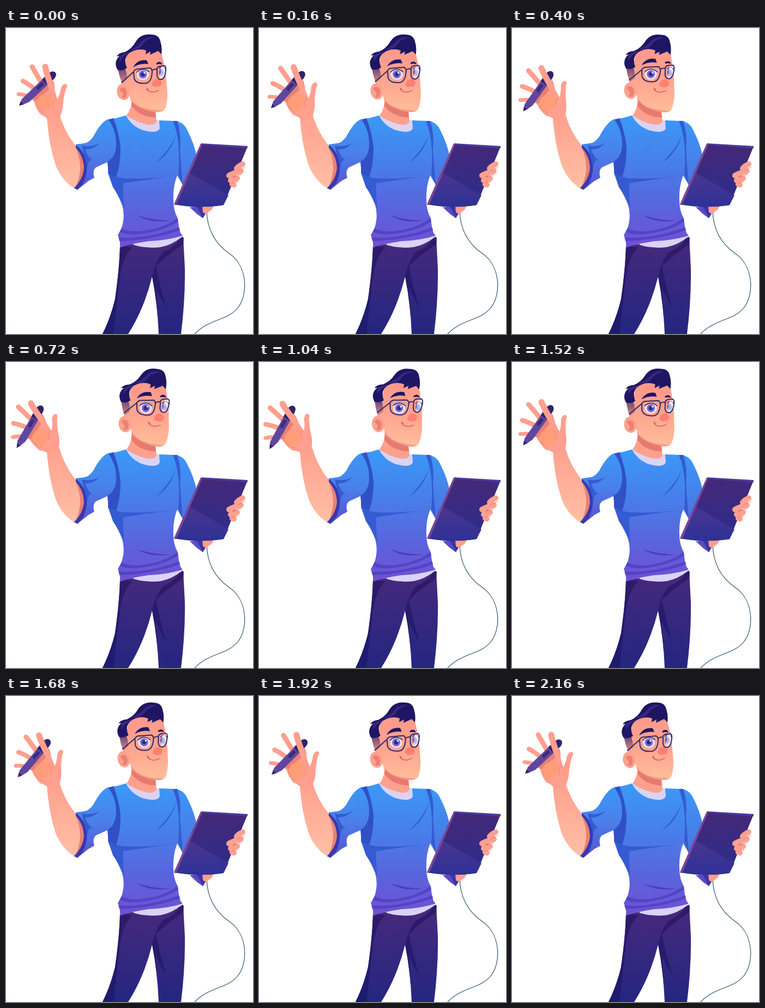
Recreate the animation shown at these times as an HTML page. Size 453x560 px, loop 2240 ms.

```html
<!DOCTYPE html>
<html lang="en">
<head>
<meta charset="utf-8">
<title>Waving designer</title>
<style>
html, body { margin: 0; height: 100%; overflow: hidden; background: #fff; }
svg { display: block; width: 100vw; height: 100vh; }
.line { fill: none; stroke-linecap: round; stroke-linejoin: round; }
.fold { fill: #345bd2; }
.low { fill: #4d3dbf; }
.hair { fill: #1e1664; }
.shade { fill: #ea8074; }
.frame { stroke: #302967; stroke-width: 2; }
.finger { stroke: #ff9f8e; }
</style>
</head>
<body>
<svg viewBox="0 0 453 560">
  <defs>
    <linearGradient id="shirt" gradientUnits="userSpaceOnUse" x1="0" y1="165" x2="0" y2="400">
      <stop stop-color="#3b98f7"/><stop offset=".35" stop-color="#477fea"/>
      <stop offset=".7" stop-color="#5a64dc"/><stop offset="1" stop-color="#7050d4"/>
    </linearGradient>
    <linearGradient id="sleeve" gradientUnits="userSpaceOnUse" x1="0" y1="165" x2="0" y2="295">
      <stop stop-color="#3b98f7"/><stop offset=".5" stop-color="#4a80e9"/><stop offset="1" stop-color="#5a50d0"/>
    </linearGradient>
    <linearGradient id="pants" gradientUnits="userSpaceOnUse" x1="0" y1="390" x2="0" y2="560">
      <stop stop-color="#46297d"/><stop offset="1" stop-color="#242680"/>
    </linearGradient>
    <linearGradient id="pantsDark" gradientUnits="userSpaceOnUse" x1="0" y1="390" x2="0" y2="560">
      <stop stop-color="#311a68"/><stop offset="1" stop-color="#1c1c70"/>
    </linearGradient>
    <linearGradient id="tablet" x1="0" y1="0" x2="0" y2="1">
      <stop stop-color="#452878"/><stop offset="1" stop-color="#2a2d8c"/>
    </linearGradient>
    <linearGradient id="glare" x1="0" y1="0" x2="0" y2="1">
      <stop stop-color="#4c3590"/><stop offset="1" stop-color="#2d3196"/>
    </linearGradient>
    <linearGradient id="face" gradientUnits="userSpaceOnUse" x1="0" y1="45" x2="0" y2="153">
      <stop stop-color="#ff9a8b"/><stop offset=".5" stop-color="#ffa590"/><stop offset="1" stop-color="#ffbe9a"/>
    </linearGradient>
    <linearGradient id="arm" gradientUnits="userSpaceOnUse" x1="0" y1="155" x2="0" y2="295">
      <stop stop-color="#ffa08f"/><stop offset="1" stop-color="#ffc0a4"/>
    </linearGradient>
    <linearGradient id="side" x1="0" y1="0" x2="0" y2="1">
      <stop stop-color="#5b3c70"/><stop offset="1" stop-color="#e58f87"/>
    </linearGradient>
  </defs>

  <!-- cord -->
  <path class="line" stroke="#31586f" stroke-width="1.200" d="M368 334C369 374 388 398 410 413C442 435 445 485 426 511C407 536 372 532 346 560"/>

  <!-- trousers -->
  <path fill="url(#pants)" d="M209 399Q208 440 200 496Q192 530 177 560H224Q253 515 268 455Q278 505 280 560H321Q329 495 328 440L325 382Z"/>
  <g fill="url(#pantsDark)">
    <path d="M209 399L232 401Q212 420 208 465L197 560H177Q192 530 200 496Q208 440 209 399Z"/>
    <path d="M326 384L325 396Q292 418 275 436Q284 480 294 511Q281 493 275 474L280 560Q278 505 268 455Q273 428 288 410Q309 402 318 386Z"/>
  </g>

  <!-- shirt -->
  <path fill="#dad3f5" d="M234 394L318 376L322 383Q304 397 284 401Q257 404 234 397Z"/>
  <path fill="url(#shirt)" d="M187 168L202 165L220 160Q250 182 281 169L308 170L316 171Q328 176 332 186Q346 213 350 237L324 287L314 270Q306 290 307 315Q307 335 315 348L317 364L320 375L324 380Q294 389 263 390Q230 394 209 402Q210 389 205 379L212 366Q219 344 213 324Q206 306 196 291L187 266Z"/>
  <path class="fold" d="M306 170L314 170Q322 195 319 222L324 287L316 268Q321 205 306 170Z"/>
  <path class="fold" d="M313 192Q302 222 275 246Q301 232 313 192Z"/>
  <path class="fold" d="M187 260Q196 273 215 275Q260 277 308 271Q261 277 215 284Q214 305 217 330Q207 305 196 291Z"/>
  <g class="low">
    <path d="M239 342Q265 359 302 352Q270 353 239 342Z"/>
    <path d="M212 366Q219 373 246 372Q288 368 314 348L316 354Q289 372 244 377Q221 379 209 373Z" opacity=".75"/>
    <path d="M206 383Q253 388 318 365L319 370Q275 387 208 390Z" opacity=".75"/>
  </g>

  <!-- raised arm -->
  <path fill="url(#arm)" d="M75 163Q78 212 91 251Q102 279 126 294L142 277L147 240L129 217Q107 190 98 158Z"/>
  <path class="shade" d="M127 217Q137 239 136 260Q134 279 126 294L142 284L147 243Z"/>
  <path fill="url(#sleeve)" d="M187 167Q174 172 160 199Q151 211 143 211L128 213L128 219Q143 236 143 257Q141 277 125 293L131 296L151 280L162 274Q158 261 165 255L187 245Q205 218 202 165Z"/>
  <path fill="#3839ad" d="M128 214Q144 226 148 247Q150 266 141 285L131 296L125 293Q141 277 143 257Q143 236 128 219Z"/>
  <path class="fold" d="M139 215Q157 219 172 210Q158 224 145 222Q151 239 160 242Q151 239 149 255Z"/>
  <path fill="#3150c6" d="M188 168L197 165Q207 190 210 218Q210 252 202 272L188 267L186 245Q202 235 202 212Q202 187 188 168Z"/>

  <!-- neck -->
  <path fill="#dad3f5" d="M220 160Q229 178 248 186Q276 195 282 184L281 169Z"/>
  <path fill="#ffa08d" d="M230 120Q233 145 221 160Q239 173 261 177Q275 178 276 170L274 152Z"/>
  <path fill="#e77a70" d="M231 132Q246 150 274 152L275 164Q242 162 230 142Z"/>

  <!-- tablet and holding hand -->
  <path fill="#5a4ac5" d="M337 328L351 341L361 348L370 334L372 324Z"/>
  <path fill="#3c33a5" d="M350 327L361 348L366 338L362 327Z"/>
  <path fill="#ff9d8b" d="M360 326L361 337Q367 343 372 336Q378 334 381 325Z"/>
  <path fill="url(#tablet)" d="M357 212L443 217L399 324Q356 331 308 323Z"/>
  <path fill="url(#glare)" d="M335 264L408 306L399 324Q356 331 310 323Z"/>
  <path fill="#7d4795" d="M357 212L360 213L312 324L308 323Z"/>
  <path fill="#4b3b9d" d="M357 211L443 216L443 220L361 214Z"/>
  <path class="line" stroke="#ffa08f" stroke-width="10" d="M434 249Q427 252 423 257M431 262Q420 264 409 270M424 275L412 279M418 287L415 286"/>
  <path class="line" stroke="#e87a70" d="M438 255L424 262M431 268L415 274M426 281L414 284"/>

  <g id="head">
    <path fill="url(#side)" d="M205 72L225 70L224 97L214 104Q207 88 205 72Z"/>
    <path fill="url(#face)" d="M221 48Q235 34 260 36L284 42Q290 63 293 85L296 119Q296 140 291 149Q283 156 266 152Q240 147 229 132L222 112L214 101L222 93Q222 83 218 73Z"/>
    <path fill="#f28e7c" d="M229 130Q239 146 266 149L289 151Q281 156 266 152Q238 147 228 132Z" opacity=".7"/>
    <ellipse cx="215" cy="117" rx="11.500" ry="15" fill="#ffa18d" transform="rotate(-12 215 117)"/>
    <path class="shade" d="M208 113Q212 106 219 111Q224 118 220 126Q215 130 212 126Q217 123 213 118Z"/>
    <path class="hair" d="M205 77Q198 66 204 56L208 51L203 52Q207 45 218 44Q231 38 238 25Q247 10 267 12Q280 12 283 24Q287 36 285 48L279 42L264 49L265 43L256 48L257 41Q245 37 233 42Q221 47 219 57Q218 66 222 73Q213 79 205 77Z"/>
    <path fill="#39277f" d="M226 41Q242 34 250 23Q259 15 273 17Q255 21 251 30Q244 41 226 41ZM208 52Q217 45 228 44Q214 51 209 62Z"/>
    <ellipse cx="251" cy="85" rx="11" ry="10" fill="#f1e6fb"/>
    <ellipse cx="287" cy="80" rx="5.500" ry="10" fill="#f1e6fb"/>
    <circle cx="251" cy="85" r="7.500" fill="#7770d6"/>
    <ellipse cx="285" cy="81" rx="4.500" ry="7.500" fill="#7770d6"/>
    <circle cx="251" cy="85" r="4" fill="#352985"/>
    <ellipse cx="284.500" cy="81" rx="2.500" ry="4" fill="#352985"/>
    <circle cx="254" cy="82" r="1.700" fill="#fff"/>
    <path class="line" stroke="#302967" stroke-width="1.600" d="M240 81Q250 71 262 80M281 74Q287 67 292 74"/>
    <path fill="#ff8070" d="M270 96Q278 90 284 96Q288 103 281 107Q269 109 267 103Z"/>
    <path class="line" stroke="#d95e62" stroke-width="1.500" d="M258 112Q262 118 272 117L280 114M258 110L261 113"/>
    <g id="eyewear">
      <path class="hair" d="M233 72Q241 57 258 59L261 66Q246 64 233 72ZM276 64Q284 59 287 67Q281 65 276 67Z"/>
      <path fill="#fff" opacity=".6" d="M285 70L292 69L287 93L281 94Z"/>
      <path class="line frame" d="M212 100L233 81M234 80Q236 75 243 75L264 73Q268 74 268 81Q267 99 257 101Q238 103 235 92ZM268 78Q272 74 277 76M277 74Q278 71 282 70L290 69Q294 70 293 78Q292 91 286 94Q278 95 277 87Z"/>
    </g>
  </g>

  <g id="hand">
    <g class="line finger">
      <path stroke-width="7" d="M23 121Q40 122 56 132"/>
      <path stroke-width="8.500" d="M31 97Q45 104 62 120"/>
      <path stroke-width="9" d="M48 71Q55 83 69 108"/>
    </g>
    <path fill="#ff9f8e" d="M49 126L62 106Q74 98 88 109L94 130Q99 122 101 109Q106 100 111 103Q114 106 110 111Q105 128 104 146Q102 157 98 164Q93 170 76 167Q73 162 63 158Q54 147 49 126Z"/>
    <path class="shade" d="M45 128L87 96L89 106Q73 116 55 134Z"/>
    <ellipse cx="71" cy="135" rx="17" ry="14" fill="#ff9c72" opacity=".75" transform="rotate(-30 71 135)"/>
    <path class="line" stroke="#ed8578" d="M54 133Q57 149 68 154M91 129Q84 135 87 145"/>
    <path fill="#5f479f" d="M24 142L29 130L75 86Q84 76 91 82Q94 88 86 95L43 135L32 140Z"/>
    <path fill="#30246d" d="M24 142L27 134L32 140ZM66 94L77 84Q86 76 91 82Q94 88 86 95L75 104Z"/>
    <path fill="#3b2b76" d="M55 109L66 99L70 103L58 114Z"/>
    <path class="line finger" stroke-width="11" d="M72 71Q75 86 84 110"/>
  </g>
</svg>
<script>
const STEP = 80, LOOP = 2240, PEAK = 1040, END = 2160;
const [head, eyewear, hand] = ["head", "eyewear", "hand"].map(id => document.getElementById(id));

// 0 = rest, 1 = fully turned: quick ease out, then a sine return
function sway(t) {
  if (t < PEAK) return 1 - (1 - t / PEAK) ** 2;
  const p = Math.min(1, (t - PEAK) / (END - PEAK));
  return (1 + Math.cos(Math.PI * p)) / 2;
}

const start = performance.now();
function draw() {
  const time = (performance.now() - start) % LOOP;
  const k = sway(Math.floor(time / STEP) * STEP);
  hand.setAttribute("transform", `rotate(${-18 * k} 75 165)`);
  head.setAttribute("transform", `rotate(${4.5 * k} 262 160)`);
  eyewear.setAttribute("transform", `translate(0 ${-4 * k})`);
  requestAnimationFrame(draw);
}
draw();
</script>
</body>
</html>
```
